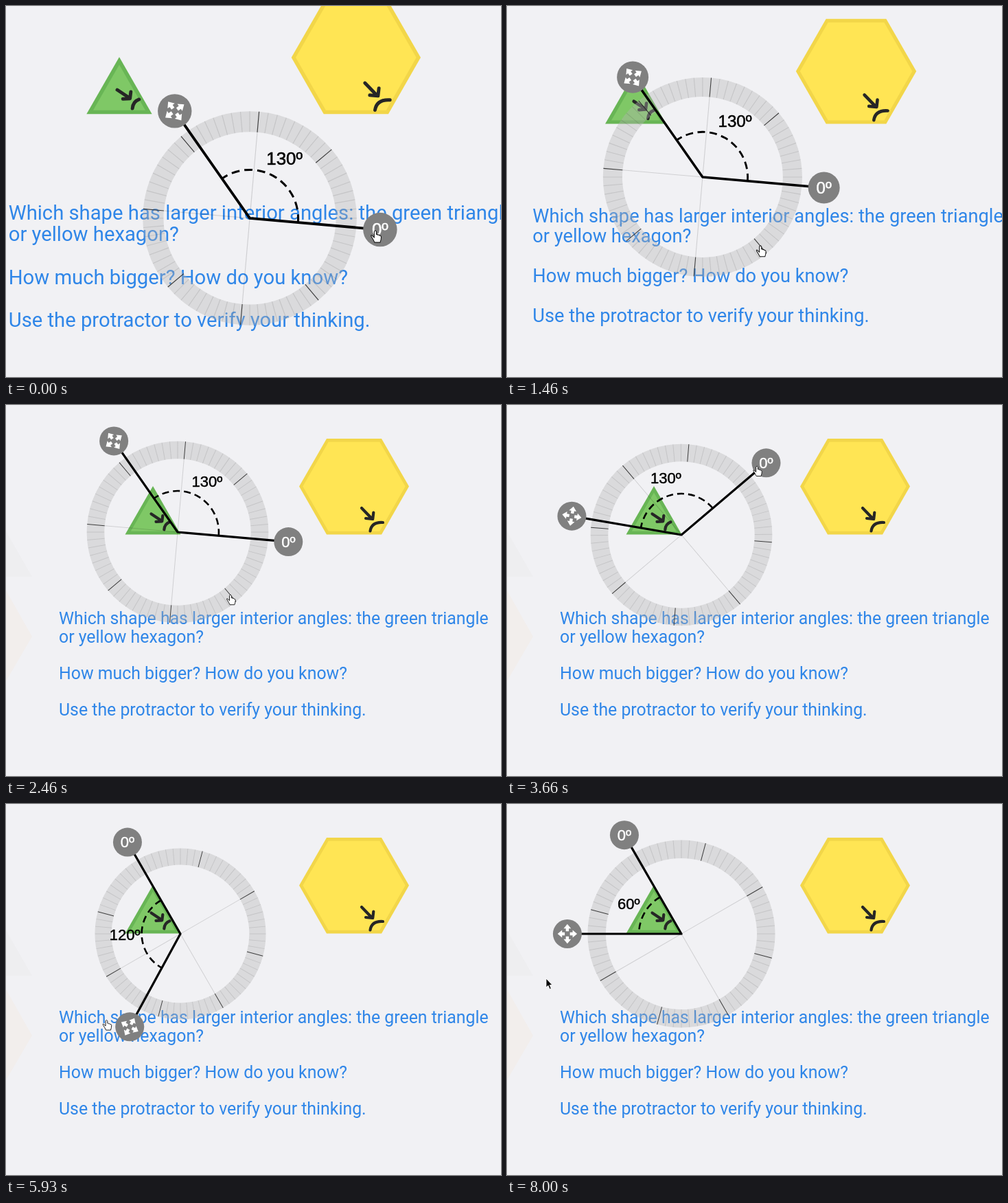
Write an HTML page that moves like this. It is 721x540 px and loops after 9.06 s.

```html
<!DOCTYPE html>
<html lang="en">
<head>
<meta charset="utf-8">
<title>Protractor</title>
<style>
  html, body { margin: 0; width: 100%; height: 100%; overflow: hidden; background: #f1f1f4; }
  svg { display: block; width: 100vw; height: 100vh; }
  .question { font: 400 24.85px Roboto, sans-serif; fill: #2f86e8; }
  .label { font: 22px "Liberation Sans", Arial, sans-serif; text-anchor: middle; stroke-width: .45; }
  .ink { fill: none; stroke: #262626; stroke-width: 4.2; stroke-linecap: round; stroke-linejoin: round; }
  .arm { fill: none; stroke: #000; stroke-width: 3.2; stroke-linejoin: round; }
</style>
</head>
<body>
<svg viewBox="0 0 721 540">
  <g id="camera">
    <path d="M-60 250L-11 165 38 250Z" fill="#eeeef0"/>
    <path d="M-40 270H0L38 337 0 402H-40Z" fill="#f2eeec"/>

    <path d="M214 118L254.500 188.500H173.500Z" fill="#68b555"/>
    <path d="M214 127.500L246.300 183.800H181.700Z" fill="#7fc866"/>
    <path d="M467 49H547L587 118.500 547 188.500H467L427 118.500Z" fill="#f2d649"/>
    <path d="M469.700 53.700H544.300L581.600 118.500 544.300 183.800H469.700L432.400 118.500Z" fill="#ffe554"/>
    <g class="ink">
      <path d="M211.500 158.500L226.500 168.500M228.300 161L227.300 169.300 218.500 169.800M230.300 181.500Q231 173 238.500 170.300"/>
      <path d="M518 150L533 165.500M535.300 156.500L534.200 166 524 165M530.500 183.500Q532.500 170 549 171"/>
    </g>

    <g class="question">
      <text x="77" y="319">Which shape has larger interior angles: the green triangle</text>
      <text x="77" y="345.500">or yellow hexagon?</text>
      <text x="77" y="398.600">How much bigger? How do you know?</text>
      <text x="77" y="451.600">Use the protractor to verify your thinking.</text>
    </g>

    <g id="protractor">
      <g id="dial">
        <circle r="119.500" fill="none" stroke="#b4b4b4" stroke-opacity=".38" stroke-width="25.600"/>
        <path stroke="#000" stroke-opacity=".14" d="M-106.500 0H106.500M0-106.500V106.500"/>
        <path id="minor" stroke="#000" stroke-opacity=".1"/>
        <path id="major" stroke="#222" stroke-opacity=".85"/>
      </g>
      <path id="arc" fill="none" stroke="#000" stroke-width="2.600" stroke-dasharray="10 6"/>
      <path id="arms" class="arm"/>
      <text id="angle" class="label" stroke="#000"></text>
      <g id="zero">
        <circle r="21" fill="#808080"/>
        <text class="label" y="7.500" fill="#fff" stroke="#fff">0º</text>
      </g>
      <g id="mover">
        <circle r="21" fill="#808080"/>
        <g id="icon" fill="#fff"></g>
      </g>
    </g>

    <g id="cursor">
      <path id="hand" fill="#fff" stroke="#111" stroke-linejoin="round" transform="scale(.92)"
        d="M-1.600 9.500L-4.600 6.600Q-6.200 5.600-5.800 7.600L-3 12.200-1 16H6.400Q7.800 12 7.800 8.600 7.200 6.200 5.600 6.800 5 5.200 3.400 6 2.600 4.800 1.400 5.200V1.400Q0-1-1.600 1.400Z"/>
      <path id="pointer" stroke="#fff" stroke-width=".9" d="M0 0V13L3 10.300 5.200 15.500 7.400 14.500 5.200 9.500H9Z"/>
    </g>
  </g>
</svg>
<script>
const LOOP = 9060, FPS = 15, DIAL = 132.3;
const $ = id => document.getElementById(id);
const set = (id, name, value) => $(id).setAttribute(name, value);

// Progress from 0 to 1 between two times, plain or eased.
const ramp = (t, from, to) => Math.min(1, Math.max(0, (t - from) / (to - from)));
const smooth = p => p * p * p * (p * (6 * p - 15) + 10);
const easeOut = (p, power) => 1 - (1 - p) ** power;
const bump = p => Math.sin(Math.PI * p);

const mix = (a, b, p) => a.map((v, i) => v + (b[i] - v) * p);
const add = (a, b) => a.map((v, i) => v + b[i]);
const move = p => `translate(${p})`;
function polar(r, deg) {
  const a = deg * Math.PI / 180;
  return [r * Math.cos(a), -r * Math.sin(a)];
}

function buildDial() {
  let minor = "", major = "";
  for (let d = 0; d < 360; d += 5) {
    const tick = `M${polar(106.7, d)}L${polar(DIAL, d)}`;
    if (d % 45) minor += tick; else major += tick;
  }
  set("minor", "d", minor);
  set("major", "d", major);
  $("icon").innerHTML = [0, 90, 180, 270].map(d =>
    `<path transform="rotate(${d})" d="M3.800-2.200H7.700V-5.400L14.200 0 7.700 5.400V2.200H3.800Z"/>`).join("");
}

// The dial is dragged along a curve to the triangle, then nudged onto its corner.
function dialCenter(t) {
  const p = ramp(t, 930, 2060), bend = [281.7, 256], stop = [258, 191.5];
  const curve = mix(mix([375.5, 317.3], bend, p), mix(bend, stop, p), p);
  const near = mix(curve, [250, 185], ramp(t, 2130, 2460));
  return mix(near, [254, 189], ramp(t, 2660, 2800));
}

// Stretching the handles also changes the size of the dial.
const dialRadius = t => DIAL + 9.2 * ramp(t, 5460, 5660) - 17 * ramp(t, 5730, 5930)
  + 15.8 * ramp(t, 5930, 6600) - 3.8 * ramp(t, 7000, 7200);

const zeroAngle = t => -5 + 122 * easeOut(ramp(t, 3553, 4530), 4) + 3 * ramp(t, 4730, 5060);

const sweepAngle = t => 130 - 8.6 * ramp(t, 5730, 5930)
  - 61 * easeOut(ramp(t, 5930, 6760), 3) - 0.4 * ramp(t, 7400, 7460);

// The hand goes from one grip to the next and follows what it holds.
function cursorAt(t, center, reach, turn, end) {
  const rim = add(center, [77, 91]);
  const zero = add(center, polar(reach - 13 - 25 * ramp(t, 3660, 4530), turn + 2));
  const mover = add(center, polar(reach + 11, end + 5 - 17 * bump(ramp(t, 5730, 6130))));
  const reachOut = ramp(t, 2800, 3330);
  let p = mix([531, 332.5], rim, ramp(t, 660, 930));
  p = add(mix(p, zero, smooth(reachOut)), [75 * bump(reachOut), 0]);
  p = mix(p, mover, smooth(ramp(t, 5130, 5460)));
  return mix(p, [57, 254], ramp(t, 7800, 8000));
}

function draw(time) {
  const step = Math.floor((time % LOOP + 7) * FPS / 1000);
  const t = Math.floor(step * 100 / FPS) * 10;
  const zoom = 1.177 - 0.177 * smooth(ramp(t, 1035, 1925));
  const center = dialCenter(t), r = dialRadius(t), turn = zeroAngle(t), sweep = sweepAngle(t);
  const end = turn + sweep, reach = r + 29.6;
  const zero = polar(reach, turn), mover = polar(reach, end);

  set("camera", "transform", `translate(491 364.5) scale(${zoom}) translate(-491 -364.5)`);
  set("protractor", "transform", move(center));
  set("dial", "transform", `rotate(${-turn}) scale(${r / DIAL})`);
  set("arms", "d", `M${zero}L0 0L${mover}`);
  const arc = r * 0.453;
  set("arc", "d", `M${polar(arc, turn)}A${arc} ${arc} 0 0 0 ${polar(arc, end)}`);

  const [x, y] = polar(r * 0.65, turn + sweep / 2);
  set("angle", "x", x);
  set("angle", "y", y + 8.3);
  $("angle").textContent = Math.round(sweep / 5) * 5 + "º";
  set("zero", "transform", move(zero));
  set("mover", "transform", move(mover));
  set("icon", "transform", `rotate(${-end})`);

  const free = t >= 7930;
  set("cursor", "transform", move(cursorAt(t, center, reach, turn, end)));
  set("hand", "visibility", free ? "hidden" : "visible");
  set("pointer", "visibility", free ? "visible" : "hidden");
}

buildDial();
const start = performance.now();
function tick() {
  draw(performance.now() - start);
  requestAnimationFrame(tick);
}
draw(0);
requestAnimationFrame(tick);
</script>
</body>
</html>
```
